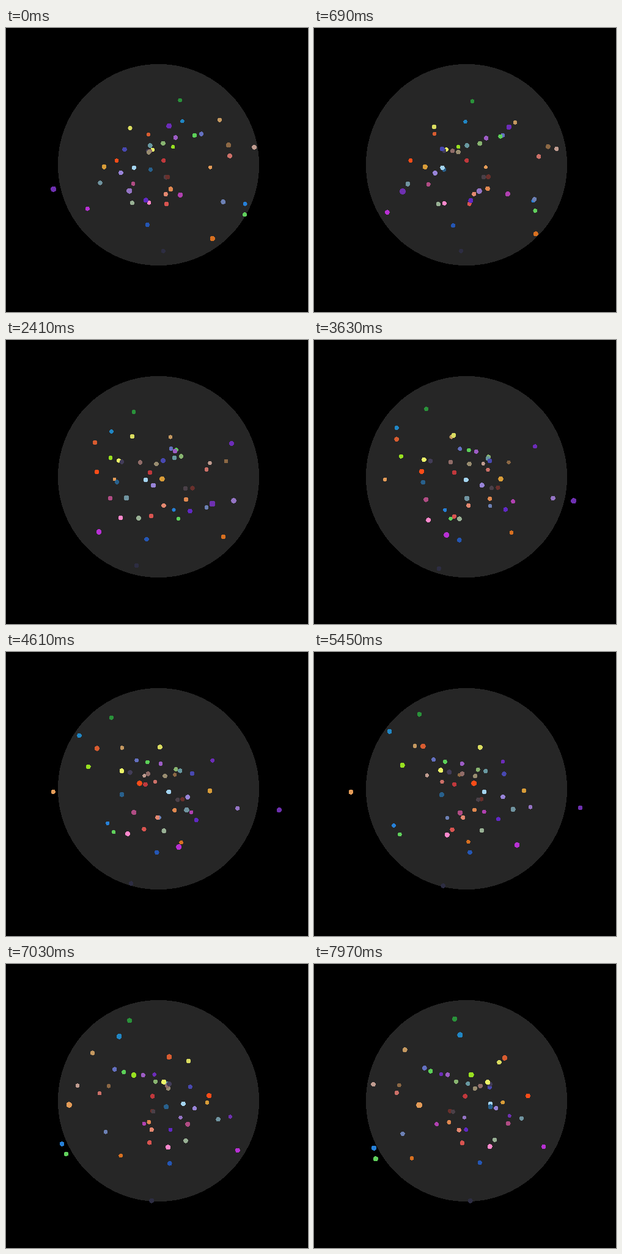
A matplotlib script that plays this animation: 494 px wide and 464 px high, repeating every 7990 ms.

```python
import numpy as np
import matplotlib.pyplot as plt
from matplotlib.animation import FuncAnimation
from matplotlib.colors import to_rgba_array
from matplotlib.patches import Circle

W, H, DPI = 494, 464, 64
LOOP, FRAMES = 7990, 470
TICK = LOOP // FRAMES
CX, CY, SPHERE_R = 249, 223, 164
EYE = 610          # viewing distance in pixels
DOT_R = 3.15       # dot radius at the centre depth
STEP_A, STEP_B, LAST = 53, 134, 170

# x at step A, x at step B, y at step A, colour
DOTS = [
    (208.5, 181.5, 117, "#2a923a"), (172, 144, 149, "#2086c4"),
    (268.5, 148, 158, "#c49860"), (368.5, 277, 168.5, "#6c2cb8"),
    (206, 287, 157, "#dadc60"), (145, 218, 167, "#d85c30"),
    (276, 232, 181, "#9c5cc4"), (278, 201, 179, "#5cd058"),
    (269.5, 183, 177, "#6470c0"), (359.5, 202, 197.5, "#8c6844"),
    (333, 148, 200.5, "#c09c90"), (327.5, 179, 211, "#cc7068"),
    (286, 256.5, 189.5, "#88b470"), (170.5, 168.5, 192, "#98e020"),
    (275, 273, 192, "#6898a0"), (184, 230, 196.5, "#ecf468"),
    (245.5, 265, 202, "#988c70"), (256.5, 309, 196.5, "#4848b0"),
    (189, 242.5, 198.5, "#423c58"), (219, 252.5, 199.5, "#906c68"),
    (148, 300, 215, "#fa4c18"), (235, 233, 216, "#c0383c"),
    (255, 341, 226.5, "#d89c38"), (228, 286, 228, "#a4d4f0"),
    (181, 233, 231.5, "#28608c"), (240.5, 312, 237, "#9884d8"),
    (177, 66, 227, "#e49c58"), (304.5, 257, 241.5, "#6a302c"),
    (293, 255, 242, "#4a4048"), (196.5, 342, 257.5, "#7094a0"),
    (170, 268.5, 258, "#b04c84"), (372, 322.5, 262, "#9474c4"),
    (294, 248, 260, "#e08850"), (257.5, 240, 270, "#e48870"),
    (338, 252.5, 266, "#b040b0"), (300.5, 287, 279, "#6028c4"),
    (187, 239.5, 290, "#ff88cc"), (216.5, 286, 290.5, "#98b094"),
    (237, 228.5, 287, "#d85450"), (327.5, 188.5, 273, "#6c80b4"),
    (274, 104.5, 277, "#2680d8"), (281.5, 113.5, 291.5, "#60d05c"),
    (151.5, 363.5, 313, "#b830d4"), (337, 407, 267, "#6e30b0"),
    (229.5, 261.5, 325, "#2456b4"), (355, 219.5, 321, "#d87020"),
    (213, 222, 368, "#2d2d42"),
]
xa, xb, ya = np.array([d[:3] for d in DOTS]).T
xa, xb, ya = xa - CX, xb - CX, ya - CY
colors = to_rgba_array([d[3] for d in DOTS])


def angle(step):
    """Even turning after a first, larger jump."""
    return np.radians(5 + 1.13 * step if step else -0.5)


def view(step):
    """Sideways position and perspective scale of every dot."""
    c, s = np.cos(angle(step)), np.sin(angle(step))
    scale = 1 / (1 - (depth * c - side * s) / EYE)
    return (side * c + depth * s) * scale, scale


def row(x, step):
    c, s = np.cos(angle(step)), np.sin(angle(step))
    return c - x * s / EYE, s + x * c / EYE


# Solve each orbit from its two known sideways positions.
p, q = row(xa, STEP_A)
u, v = row(xb, STEP_B)
det = p * v - q * u
side = (xa * v - xb * q) / det
depth = (p * xb - u * xa) / det
height = ya / view(STEP_A)[1]


def step_at(t):
    """Steps come in threes: one long hold and two short ones."""
    if t < 30:
        return int(t >= 20)
    group, rest = divmod(t - 30, 140)
    return min(2 + 3 * group + (rest >= 100) + (rest >= 120), LAST)


fig = plt.figure(figsize=(W / DPI, H / DPI), dpi=DPI, facecolor="black")
ax = fig.add_axes([0, 0, 1, 1])
ax.set_xlim(-0.5, W - 0.5)
ax.set_ylim(H - 0.5, -0.5)
ax.axis("off")
ax.add_patch(Circle((CX, CY), SPHERE_R, fc="#262626", ec="none", aa=False))
dots = ax.scatter(xa, ya, c=colors, linewidths=0, zorder=3, antialiased=False)


def draw(i):
    x, scale = view(step_at((i + 1) * TICK - 1))
    order = np.argsort(scale)
    xy = np.column_stack([CX + x, CY + height * scale])
    dots.set_offsets(xy[order])
    dots.set_sizes((2 * DOT_R * scale[order] * 72 / DPI) ** 2)
    dots.set_facecolors(colors[order])
    return (dots,)


anim = FuncAnimation(fig, draw, frames=FRAMES, interval=TICK,
                     repeat=True, repeat_delay=0, blit=False)
plt.show()
```
